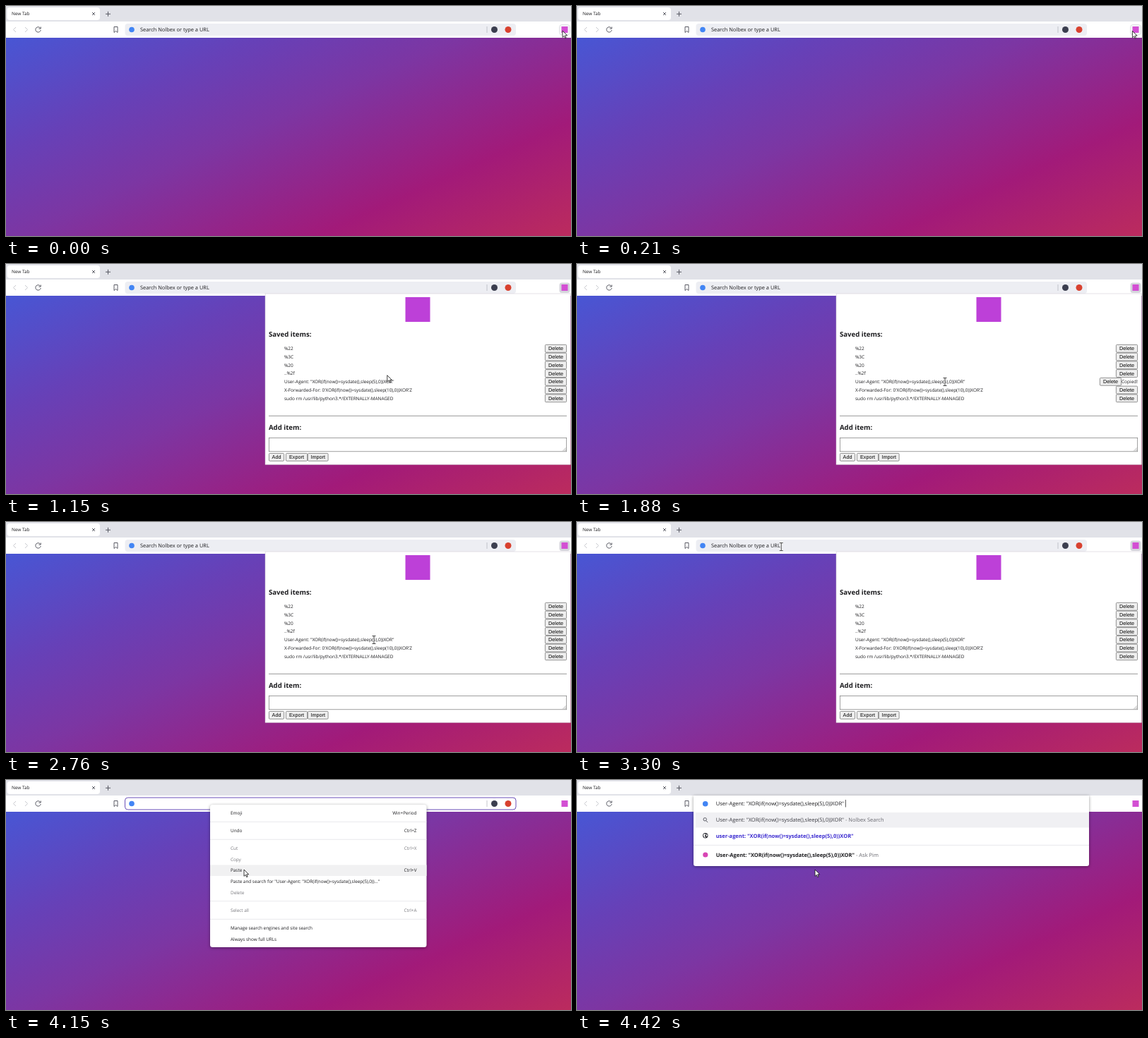
Recreate the animation shown at these times as an HTML page. Size 800 by 326 pixels, loop 4510 ms.

```html
<!DOCTYPE html>
<html lang="en">
<head>
<meta charset="utf-8">
<title>Saved items popup</title>
<style>
  html, body { margin: 0; width: 100%; height: 100%; overflow: hidden; background: #fff; }
  svg { display: block; width: 100%; height: 100%; }
  text { font-family: "Open Sans", "Noto Sans", sans-serif; fill: #1c1c1f; white-space: pre; text-rendering: geometricPrecision; }
  .button { font-family: "Liberation Sans", Arial, sans-serif; fill: #000; text-anchor: middle; }
  .line { fill: none; stroke: #4a4b55; stroke-width: .9; }
  .shadow { filter: drop-shadow(0 1px 2px #0006); }
</style>
</head>
<body>
<svg viewBox="0 0 800 326">
  <defs>
    <linearGradient id="sky" gradientUnits="userSpaceOnUse" x1="0" y1="45" x2="239" y2="576">
      <stop stop-color="#4856d4"/>
      <stop offset=".25" stop-color="#6641b8"/>
      <stop offset=".45" stop-color="#7c36a3"/>
      <stop offset=".75" stop-color="#a21a79"/>
      <stop offset="1" stop-color="#bb2b5e"/>
    </linearGradient>
  </defs>

  <rect y="45" width="800" height="281" fill="url(#sky)"/>
  <rect width="800" height="22" fill="#e1e2e8"/>
  <rect x="1.5" y="2" width="131.5" height="18" rx="4" fill="#fff"/>
  <rect y="22" width="800" height="23" fill="#fff"/>
  <path class="line" d="M122 9l4 4m0-4l-4 4M141 11.3h7m-3.5-3.5v7"/>
  <path class="line" style="stroke:#c3c4ca" d="M14 30l-3.5 3.5 3.5 3.5M27 30l3.5 3.5-3.5 3.5"/>
  <path class="line" d="M48.7 31.5A3.7 3.7 0 1 0 49.2 34M49.2 29.5v2.6h-2.8M153 29.5h5v8l-2.5-2-2.5 2z"/>

  <g id="bar">
    <rect id="field" x="168.5" y="25" width="553.5" height="17" rx="4"/>
    <circle cx="178" cy="33.5" r="3.8" fill="#4285f4"/>
    <path d="M681 29v9" stroke="#b5b6bf" stroke-width=".8"/>
    <circle cx="691.5" cy="33.5" r="4.5" fill="#3b3e4f"/>
    <circle cx="711" cy="33.5" r="4.5" fill="#d8412f"/>
    <path id="caret" d="M190.3 28v10.5" stroke="#222" stroke-width=".8"/>
  </g>
  <rect id="extension" x="783.5" y="26.5" width="15" height="14.5" rx="3.5" stroke-width=".7"/>
  <rect x="786.5" y="29" width="9" height="9" fill="#d34fd3"/>

  <g id="popup">
    <rect x="367" y="42" width="432.3" height="242.3" fill="#fff" stroke="#c9c4ce" stroke-width=".5"/>
    <rect x="565.5" y="47" width="35" height="35" fill="#bd40d8"/>
    <path d="M372 215.3h422" stroke="#8c8c8c" stroke-width=".9"/>
    <rect x="372.3" y="246.4" width="421.4" height="19.4" fill="#fff" stroke="#767676" stroke-width=".7"/>
    <path d="M788.5 265l4.5-4.5M791 265l2-2" stroke="#777" stroke-width=".6"/>
  </g>

  <g id="menu">
    <rect class="shadow" x="289" y="35" width="306.5" height="202" rx="3.5" fill="#fff"/>
    <rect id="hover" x="289" width="306.5" height="15.6" fill="#f1f1f2"/>
    <path d="M289 59.3h306.5M289 84.3h306.5M289 171.7h306.5M289 197.3h306.5" stroke="#e3e3e7" stroke-width=".8"/>
  </g>

  <g id="results">
    <path class="shadow" d="M165 22h560v97q0 3-3 3H168q-3 0-3-3z" fill="#fff"/>
    <rect x="168" y="46" width="557" height="21.5" fill="#f0f0f3"/>
    <path d="M165 92.4h560" stroke="#e3e3e7" stroke-width=".8"/>
    <circle cx="181.7" cy="33.8" r="3.8" fill="#4285f4"/>
    <path class="line" d="M182.6 57.5l2.6 2.6M183.4 55.8a2.2 2.2 0 1 1-4.4 0a2.2 2.2 0 1 1 4.4 0"/>
    <circle cx="181.8" cy="78.8" r="3.7" fill="#2b2c33"/>
    <path d="M179 77l2.3-1 1 1.6-1.6 1.4 1.3 2-.8 1.2-2-2.6zM183.5 76.2l1.3 2-1.1 2.4-1-1.5z" fill="#fff"/>
    <circle cx="181.8" cy="106" r="3.6" fill="#d846b4"/>
    <path d="M380.3 28v10.5" stroke="#222" stroke-width=".8"/>
  </g>

  <path id="arrow" d="M0 0V9.4L2.2 7.4 3.7 10.7 5.1 10.1 3.7 6.8H6.7Z" fill="#fff" stroke="#111" stroke-width=".8"/>
  <g id="beam" fill="none">
    <path d="M-2.5-5.5h5M0-5.5v11M-2.5 5.5h5" stroke="#fff" stroke-width="2.2"/>
    <path d="M-2.5-5.5h5M0-5.5v11M-2.5 5.5h5" stroke="#444" stroke-width="1"/>
  </g>
</svg>
<script>
const LOOP = 4510;
const $ = id => document.getElementById(id);
const svg = document.querySelector("svg");
const payload = 'User-Agent: "XOR(if(now()=sysdate(),sleep(5),0))XOR"';

function add(parent, tag, attributes, content = "") {
  const node = document.createElementNS(svg.namespaceURI, tag);
  for (const key in attributes) node.setAttribute(key, attributes[key]);
  node.textContent = content;
  return parent.appendChild(node);
}

// y is the vertical middle of the line.
function label(parent, x, y, size, content, style = "") {
  return add(parent, "text", { x, y: y + size * .35, "font-size": size, style }, content);
}

function button(parent, x, y, width, content) {
  const group = add(parent, "g", {});
  add(group, "rect", { x: x + .4, y: y - 5.4, width: width - .8, height: 10.8, rx: 1.2,
    fill: "#efefef", stroke: "#6f6f6f", "stroke-width": .75 });
  label(group, x + width / 2, y, 7.27, content).setAttribute("class", "button");
  return group;
}

label(svg, 8, 11.2, 6.4, "New Tab");
const placeholder = label($("bar"), 190, 33.7, 7.41, "Search Nolbex or type a URL");

// Popup
const popup = $("popup");
const items = ["%22", "%3C", "%20", "..%2f", payload,
  "X-Forwarded-For: 0'XOR(if(now()=sysdate(),sleep(10),0))XOR'Z",
  "sudo rm /usr/lib/python3.*/EXTERNALLY-MANAGED"];
label(popup, 372, 99.3, 9.6, "Saved items:", "font-weight:700");
label(popup, 372, 231.5, 9.6, "Add item:", "font-weight:700");
const deletes = items.map((item, i) => {
  const y = 119.8 + i * 11.75;
  label(popup, 394, y, 6.45, item);
  return button(popup, 763, y, 31, "Delete");
});
const copied = label(popup, 771, 166.8, 6.5, "Copied!");
button(popup, 372, 273.8, 22, "Add");
button(popup, 396, 273.8, 31, "Export");
button(popup, 427, 273.8, 29.5, "Import");

// Context menu: middle, text, shortcut, disabled
const entries = [
  [47, "Emoji", "Win+Period"],
  [72, "Undo", "Ctrl+Z"],
  [97, "Cut", "Ctrl+X", true],
  [112.7, "Copy", "", true],
  [128.2, "Paste", "Ctrl+V"],
  [143.9, `Paste and search for "${payload.slice(0, -4)}..."`, ""],
  [159.5, "Delete", "", true],
  [184.6, "Select all", "Ctrl+A", true],
  [210, "Manage search engines and site search", ""],
  [225.6, "Always show full URLs", ""]
];
for (const [y, name, shortcut, disabled] of entries) {
  const style = disabled ? "fill:#77777c" : "";
  label($("menu"), 318, y, 6.37, name, style);
  label($("menu"), 581.5, y, 6.37, shortcut, style + ";text-anchor:end");
}

// Suggestions
function suggestion(y, main, suffix, style) {
  const line = label($("results"), 196.7, y, 7.5, "");
  add(line, "tspan", { style }, main);
  add(line, "tspan", { style: "fill:#68686f" }, suffix);
}
suggestion(33.8, payload, "", "");
suggestion(56.7, payload, " - Nolbex Search", "fill:#3b3b42");
suggestion(79, payload.replace("User-Agent", "user-agent"), "", "font-weight:700;fill:#3b2bd0");
suggestion(106, payload, " - Ask Pim", "font-weight:700");
svg.append($("arrow"), $("beam"));

// Cursor stops: time, x, y
const path = [[0, 788, 35], [300, 786, 35.5], [590, 786, 35.5], [1260, 521, 167],
  [2800, 521, 167], [3310, 289, 35], [3590, 289, 35], [4110, 337, 127], [LOOP, 337, 127]];

const ramp = (t, from, to) => Math.min(1, Math.max(0, (t - from) / (to - from)));
const ease = p => p * p * (3 - 2 * p);
const show = (node, visible) => node.setAttribute("display", visible ? "inline" : "none");

function cursorAt(t) {
  const i = path.findIndex(stop => stop[0] > t);
  const [t0, x0, y0] = path[i - 1], [t1, x1, y1] = path[i];
  const p = ease(ramp(t, t0, t1));
  return [x0 + (x1 - x0) * p, y0 + (y1 - y0) * p];
}

function fade(node, opacity) {
  show(node, opacity > 0);
  node.setAttribute("opacity", opacity);
}

function render(t) {
  const [x, y] = cursorAt(t);
  const popupAlpha = ramp(t, 330, 480) - ramp(t, 3350, 3490);
  const menuAlpha = ramp(t, 3385, 3540) - ramp(t, 4230, 4330);
  const focused = t >= 3350;
  const done = t >= 4330;

  fade(popup, popupAlpha);
  popup.setAttribute("transform", `translate(0 ${-5 * (1 - popupAlpha)})`);
  fade($("menu"), menuAlpha);
  show($("results"), done);
  show($("bar"), !done);

  const isCopied = t >= 1480 && t < 2550;
  show(copied, isCopied);
  deletes[4].setAttribute("transform", `translate(${isCopied ? -23 : 0} 0)`);

  $("field").setAttribute("fill", focused ? "#fff" : "#edeef3");
  $("field").setAttribute("stroke", focused ? "#6b50b8" : "none");
  show(placeholder, !focused);
  show($("caret"), focused && (t - 3350) % 1000 < 500);

  const pressed = t >= 330 && t < 3480;
  show($("extension"), t < 3480);
  $("extension").setAttribute("fill", pressed ? "#d5d6dc" : "#f7f7f9");
  $("extension").setAttribute("stroke", pressed ? "none" : "#d5d6dc");

  const hovered = entries.find(entry => !entry[3] && Math.abs(entry[0] - y) < 7.8);
  show($("hover"), hovered && menuAlpha > 0);
  if (hovered) $("hover").setAttribute("y", hovered[0] - 7.8);

  const overItem = popupAlpha === 1 && x > 394 && x < 552 && y > 161 && y < 173;
  const overField = t > 3000 && t < 3385 && y < 42;
  const beam = overItem || overField;
  show($("beam"), beam);
  show($("arrow"), !beam);
  $(beam ? "beam" : "arrow").setAttribute("transform", `translate(${x} ${y})`);
}

function tick() {
  render(performance.now() % LOOP);
  requestAnimationFrame(tick);
}
tick();
</script>
</body>
</html>
```
